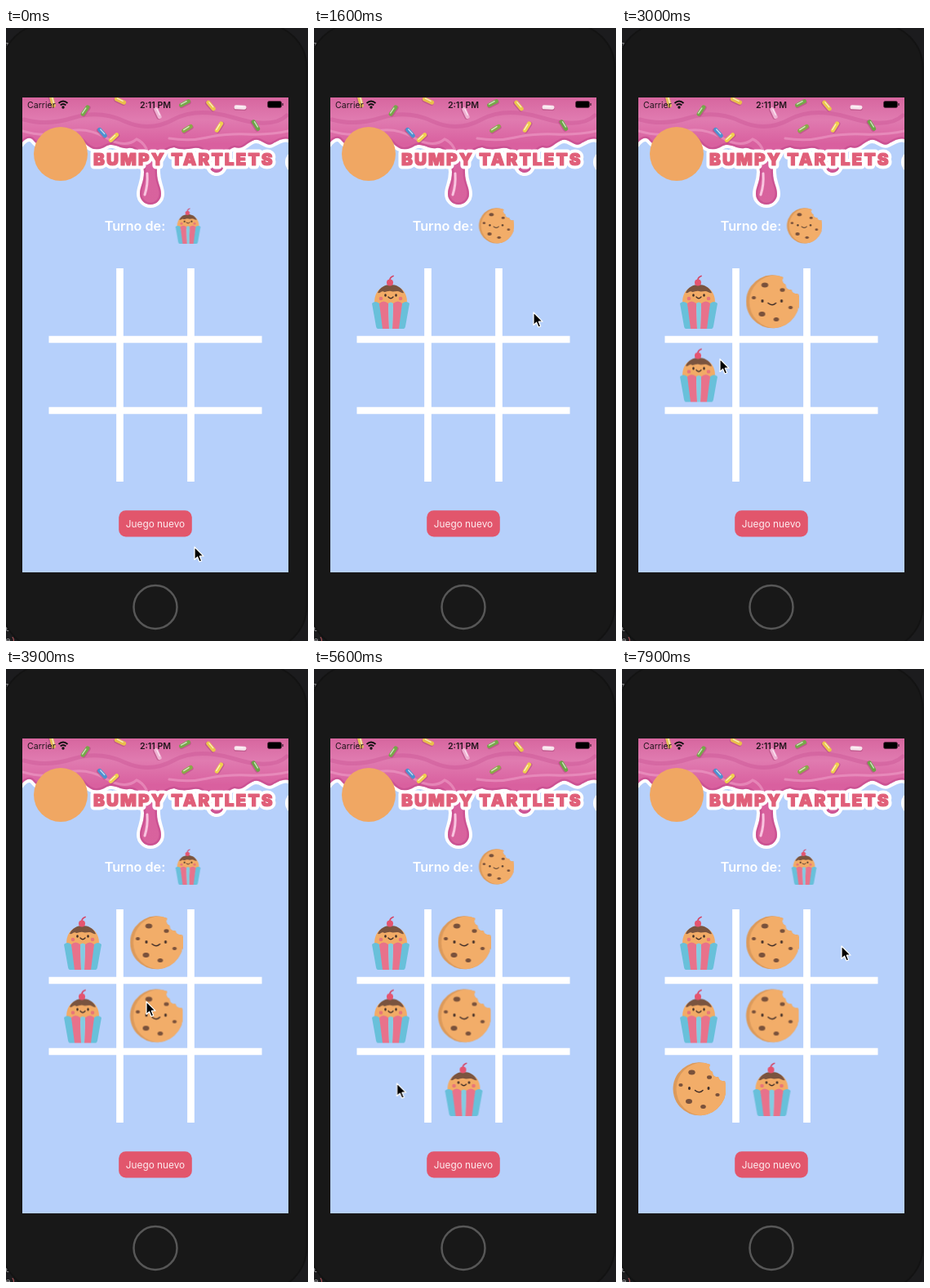
An HTML page for the animation above (8000 ms loop, 370x750 px).

```html
<!DOCTYPE html>
<html lang="es">
<head>
<meta charset="utf-8">
<title>Tres en raya</title>
<style>
html, body { margin: 0; width: 100%; height: 100%; overflow: hidden; background: #1c1c1e; }
svg { display: block; width: 370px; height: 750px; font-family: Inter, "Liberation Sans", sans-serif; }
.code { font: 11px "Noto Sans Mono", monospace; fill: #9a9a9c; }
.logo { font-size: 20.8px; font-weight: 900; letter-spacing: 2.1px; stroke-linejoin: round; }

.piece, .turn, .cursor { animation: 8s linear infinite; }
.turn { animation-timing-function: step-end; }
.cursor { animation-name: move; animation-timing-function: ease-in-out; }

@keyframes p1 { 0%, 11.24% { opacity: 0 } 11.25% { opacity: .3 } 13.75%, to { opacity: 1 } }
@keyframes p2 { 0%, 23.74% { opacity: 0 } 23.75% { opacity: .3 } 26.25%, to { opacity: 1 } }
@keyframes p3 { 0%, 34.99% { opacity: 0 } 35% { opacity: .3 } 37.5%, to { opacity: 1 } }
@keyframes p4 { 0%, 44.99% { opacity: 0 } 45% { opacity: .3 } 47.5%, to { opacity: 1 } }
@keyframes p5 { 0%, 58.74% { opacity: 0 } 58.75% { opacity: .3 } 61.25%, to { opacity: 1 } }
@keyframes p6 { 0%, 74.99% { opacity: 0 } 75% { opacity: .3 } 77.5%, to { opacity: 1 } }

@keyframes cakeTurn {
  0%, 23.75%, 45%, 75% { opacity: 1 }
  11.25%, 35%, 58.75% { opacity: 0 }
  to { opacity: 1 }
}
@keyframes cookieTurn {
  0%, 23.75%, 45%, 75% { opacity: 0 }
  11.25%, 35%, 58.75% { opacity: 1 }
  to { opacity: 0 }
}
@keyframes move {
  0%, 2% { transform: translate(231px, 635px) }
  9%, 12% { transform: translate(98px, 345px) }
  18%, 20% { transform: translate(269px, 348px) }
  23%, 26% { transform: translate(188px, 344px) }
  32%, 36% { transform: translate(103px, 416px) }
  37.5% { transform: translate(120px, 405px) }
  42%, 49% { transform: translate(172px, 407px) }
  56%, 62% { transform: translate(186px, 510px) }
  69% { transform: translate(102px, 507px) }
  73%, 79% { transform: translate(99px, 507px) }
  89%, to { transform: translate(269px, 339px) }
}
</style>
</head>
<body>
<svg viewBox="0 0 370 750">
  <defs>
    <clipPath id="screen"><path d="M20 85H346V666H20Z"/></clipPath>
    <linearGradient id="pink" x1="0" y1="85" x2="0" y2="220" gradientUnits="userSpaceOnUse">
      <stop offset="0" stop-color="#d7669f"/>
      <stop offset=".2" stop-color="#e07bb0"/>
      <stop offset=".42" stop-color="#d9609f"/>
      <stop offset="1" stop-color="#d8639d"/>
    </linearGradient>
    <path id="icing" d="M12 78H354V140C342 131 334 138 326 142S312 133 302 138S290 149 280 146C270 148 268 160 267 168A9 9 0 0 1 249 168C247 152 240 145 230 147S212 149 206 146C190 149 184 160 185 177C185 189 190 194 190 203A13 13 0 0 1 164 203C164 194 169 189 169 176C168 158 160 145 150 147S132 139 122 145S104 149 96 140S76 132 66 140S40 146 34 138S20 138 12 150Z"/>
    <clipPath id="glaze"><use href="#icing"/></clipPath>
    <g id="sprinkle" fill="none" stroke-linecap="round">
      <path d="M-5 1.200H5" stroke="#9c3a68" stroke-width="5.500" opacity=".4"/>
      <path d="M-5 0H5" stroke="currentColor" stroke-width="5"/>
      <path d="M-4.500 -1H3" stroke="#fff" stroke-width="1.400" opacity=".65"/>
    </g>

    <path id="bitten" d="M47 3A32.500 32.500 0 1 0 65 23Q58 24 57 18Q50 19 50 12Q44 9 47 3Z"/>
    <clipPath id="bite"><use href="#bitten"/></clipPath>
    <symbol id="cookie" viewBox="0 0 66 66">
      <use href="#bitten" fill="#dc9a5b"/>
      <circle cx="38" cy="33" r="32.500" fill="#f2ad69" clip-path="url(#bite)"/>
      <g fill="#79513b">
        <ellipse cx="24.500" cy="12.500" rx="4.200" ry="3"/>
        <ellipse cx="46" cy="18.500" rx="3" ry="2.300"/>
        <ellipse cx="11" cy="28" rx="2.600" ry="2"/>
        <ellipse cx="56" cy="40" rx="2.700" ry="2"/>
        <ellipse cx="21" cy="48" rx="4" ry="3"/>
        <ellipse cx="38.500" cy="54.500" rx="3.300" ry="2.500"/>
      </g>
      <g fill="#3f2d28"><ellipse cx="21.500" cy="32" rx="1.500" ry="2"/><ellipse cx="45" cy="32" rx="1.500" ry="2"/></g>
      <path d="M28.500 34.500Q33.500 39 38 34.500" fill="none" stroke="#3f2d28" stroke-width="1.500" stroke-linecap="round"/>
    </symbol>

    <symbol id="cake" viewBox="0 0 66 66">
      <path d="M14 39C11 29 15 13 33 13S55 29 52 39Z" fill="#f2ab66"/>
      <path d="M17 22C20 15 26 12 33 12S46 15 49 22C46 23 44 20 41 20S36 21 33 20S26 22 24 20.500S20 23 17 22Z" fill="#7a543f"/>
      <path d="M32 9Q31 3 36 1.500" fill="none" stroke="#d44768" stroke-width="1.800" stroke-linecap="round"/>
      <circle cx="32" cy="9.500" r="4" fill="#e4546f"/>
      <g fill="#e87579"><circle cx="21" cy="29" r="2.300"/><circle cx="45" cy="29" r="2.300"/></g>
      <g fill="#3f2d28"><ellipse cx="26.500" cy="25" rx="1.300" ry="1.800"/><ellipse cx="39.500" cy="25" rx="1.300" ry="1.800"/></g>
      <path d="M30 27Q33 30.500 36 27" fill="none" stroke="#3f2d28" stroke-width="1.300" stroke-linecap="round"/>
      <path d="M10 35Q14 31 19 35L25 66H17.500Q15.500 66 15 63ZM56 35Q52 31 47 35L41 66H48.500Q50.500 66 51 63Z" fill="#68c0da"/>
      <path d="M19 35Q24 30 30 35L31 66H23ZM47 35Q42 30 36 35L35 66H43Z" fill="#e8728b"/>
      <path d="M30 35Q33 32 36 35L35 66H31Z" fill="#82cce1"/>
    </symbol>

    <text id="title" class="logo" x="107" y="167.800">BUMPY TARTLETS</text>
  </defs>

  <path d="M0 0H370V750H0Z" fill="#1c1c1e"/>
  <g class="code">
    <text x="-1" y="24">r</text>
    <text x="-1" y="738">es</text>
    <text x="-1" y="753">e<tspan fill="#c75b62">))</tspan></text>
  </g>
  <rect x="-5" y="-5" width="373.500" height="766" rx="54" fill="#181818" stroke="#131313" stroke-width="2"/>
  <circle cx="183" cy="708.500" r="26.500" fill="#181818" stroke="#575757" stroke-width="2.500"/>

  <g clip-path="url(#screen)">
    <path d="M20 85H346V666H20Z" fill="#b6d0fb"/>
    <circle cx="356" cy="164" r="14" fill="#fff"/>
    <use href="#icing" fill="#fff" stroke="#fff" stroke-width="8" stroke-linejoin="round"/>
    <use href="#icing" fill="url(#pink)"/>
    <g fill="none" stroke-linecap="round" clip-path="url(#glaze)">
      <use href="#icing" stroke="#c2478a" stroke-width="5" opacity=".55"/>
      <path d="M20 126Q46 134 72 127T122 134T160 136Q174 142 176 164M200 135Q225 139 246 134T296 130T346 126" stroke="#f0a3cb" stroke-width="3" opacity=".55"/>
      <path d="M22 112Q50 120 82 110T145 114T205 112T280 110T344 107" stroke="#cb5695" stroke-width="5" opacity=".45"/>
      <path d="M173 178Q174 192 170 204M254 156V168" stroke="#f9c4df" stroke-width="3"/>
    </g>
    <g id="sprinkles"></g>
    <circle cx="67" cy="154" r="33" fill="#f0a763"/>
    <use href="#title" fill="#fff" stroke="#fff" stroke-width="9"/>
    <use href="#title" fill="#e05f79" stroke="#e05f79" stroke-width="1.200"/>

    <g font-size="10.600" fill="#21151c">
      <text x="26" y="97.500">Carrier</text>
      <text x="183" y="97.500" text-anchor="middle" font-weight="600">2:11 PM</text>
    </g>
    <g fill="none" stroke="#111" stroke-width="2">
      <path d="M64.500 92Q70 87 75.500 92M66.700 94.500Q70 91.500 73.300 94.500"/>
      <circle cx="70" cy="97" r=".7"/>
    </g>
    <rect x="320.500" y="89.500" width="17" height="8" rx="2" fill="#000" stroke="#5e2944" stroke-width=".8"/>
    <path d="M339 92V95" stroke="#392030" stroke-width="1.300"/>
  </g>

  <text x="120.700" y="248" font-size="16.200" font-weight="600" fill="#fff">Turno de:</text>
  <use class="turn" style="animation-name:cakeTurn" href="#cake" x="201" y="220" width="44" height="44"/>
  <use class="turn" style="animation-name:cookieTurn" href="#cookie" x="201" y="220" width="44" height="44"/>

  <path d="M139.500 294V555M226.500 294V555M52.500 381H313.500M52.500 468H313.500" stroke="#fff" stroke-width="8.700"/>
  <g id="pieces"></g>

  <rect x="138.200" y="590.200" width="89.600" height="32.200" rx="8.500" fill="#e2566c"/>
  <text x="183" y="611" font-size="11.800" text-anchor="middle" fill="#fdecef">Juego nuevo</text>

  <path class="cursor" d="M0 0V15.500L3.600 12.200L6 18L8.700 16.900L6.300 11.200H11Z" fill="#000" stroke="#fff" stroke-width="1.200" stroke-linejoin="round"/>
</svg>
<script>
const addUse = (parent, attrs) => {
  const node = document.createElementNS("http://www.w3.org/2000/svg", "use");
  for (const key in attrs) node.setAttribute(key, attrs[key]);
  document.getElementById(parent).append(node);
};

// x, y, angle, colour
[
  [57, 90, 75, "#e6c058"], [97, 101, -55, "#76a849"], [140, 89, 25, "#eabf4b"],
  [118, 128, 48, "#4b91d0"], [132, 134, -42, "#f0d04e"], [186, 104, 65, "#efb3d3"],
  [219, 92, -28, "#76a849"], [251, 95, 50, "#ecc64b"], [287, 97, 2, "#f7e3ec"],
  [306, 119, 58, "#6ca447"], [261, 121, -58, "#f0d04e"], [222, 123, -32, "#8aab48"]
].forEach(([x, y, angle, color]) =>
  addUse("sprinkles", { href: "#sprinkle", color, transform: `translate(${x} ${y}) rotate(${angle})` }));

// Board cells in playing order; cakes start.
[0, 1, 3, 4, 7, 6].forEach((cell, i) =>
  addUse("pieces", {
    href: i % 2 ? "#cookie" : "#cake",
    class: "piece",
    style: `animation-name:p${i + 1}`,
    x: 61 + cell % 3 * 89.5,
    y: 302 + Math.floor(cell / 3) * 89.5,
    width: 66,
    height: 66
  }));
</script>
</body>
</html>
```
